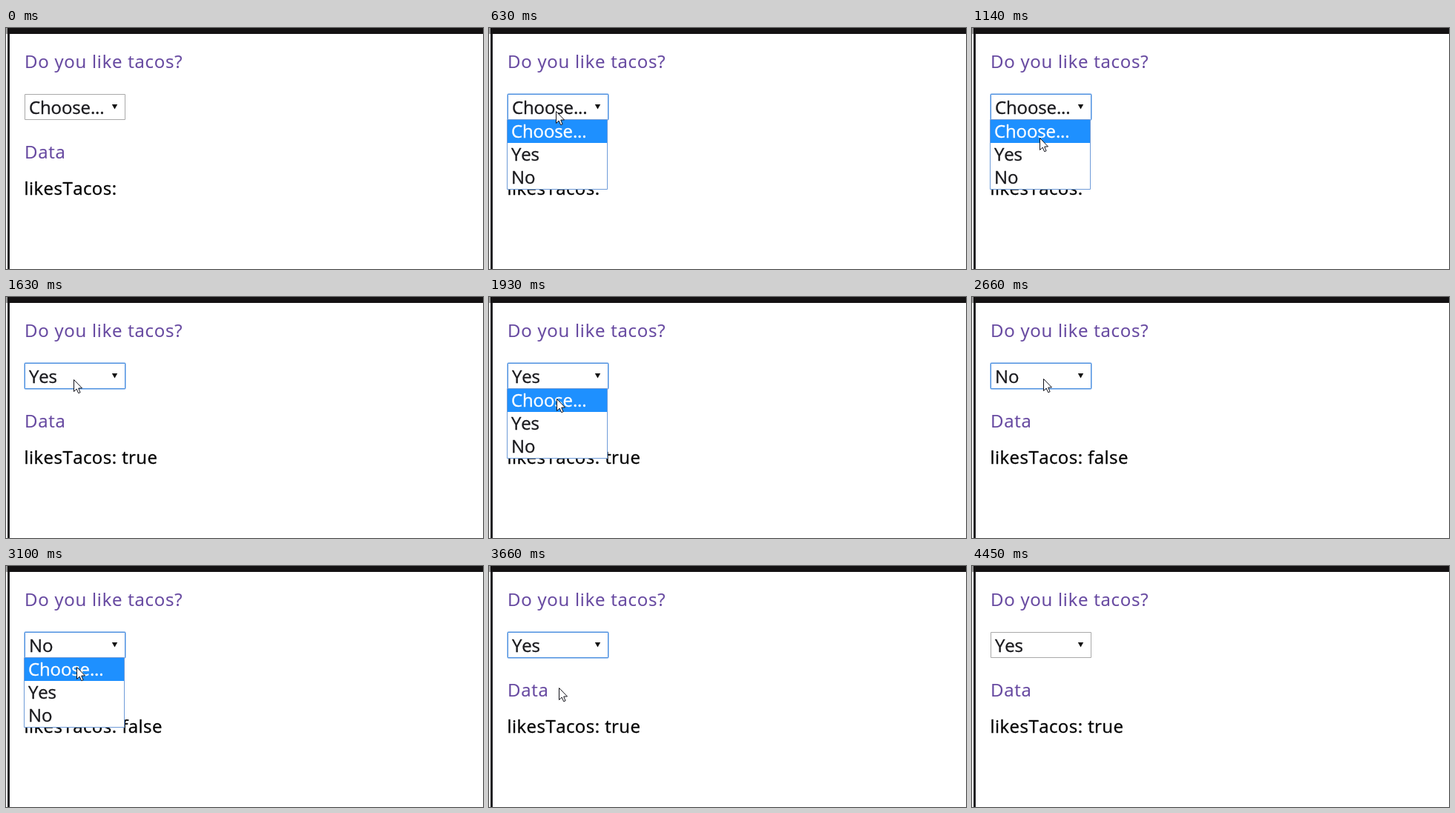
An HTML page with a canvas that plays this animation: 643x325 px, repeating every 4630 ms.

```html
<!DOCTYPE html>
<html lang="en">
<head>
<meta charset="utf-8">
<title>Select binding</title>
<style>
html, body { margin: 0; width: 100%; height: 100%; overflow: hidden; background: #fff; }
canvas { display: block; }
</style>
</head>
<body>
<canvas id="stage" width="643" height="325"></canvas>
<script>
const ctx = document.getElementById('stage').getContext('2d');
const LOOP = 4630, TICK = 70;
const OPTIONS = ['Choose...', 'Yes', 'No'];
const DATA = ['', ' true', ' false'];
const ROW_TOP = 124, ROW_H = 31;
const PURPLE = '#6648a0', INK = '#1a1a1e';

// [start time, selected option]
const PICKS = [[0, 0], [1420, 1], [2300, 2], [3590, 1]];
const OPENED = [[630, 1420], [1700, 2300], [2800, 3590]];
const FOCUS = [630, 4450];
const POINTER = [140, 4250];

// Pointer moves: start time, ticks, x, y, easing
const easeOut = p => u => 1 - (1 - u) ** p;
const smooth = u => u * u * (3 - 2 * u);
const MOVES = [
  [140, 1, 498, 1, smooth],
  [210, 7, 90, 112, easeOut(1.8)],
  [860, 8, 91, 165, smooth],
  [1490, 3, 91, 111, smooth],
  [1860, 5, 90, 186, smooth],
  [2370, 6, 96, 104, smooth],
  [3030, 7, 94, 164, easeOut(2.26)],
  [3730, 6, 509, 50, smooth],
  [4180, 1, 547, 23, smooth]
];

const within = (t, [a, b]) => t >= a && t < b;

function pointerAt(t) {
  let x = 498, y = 1;
  for (const [start, ticks, tx, ty, ease] of MOVES) {
    if (t < start) break;
    const u = ease(Math.min(1, (Math.floor((t - start) / TICK) + 1) / ticks));
    x += (tx - x) * u;
    y += (ty - y) * u;
  }
  return [Math.round(x), Math.round(y)];
}

function rect(x, y, w, h, color) {
  ctx.fillStyle = color;
  ctx.fillRect(x, y, w, h);
}

function frame(x, y, w, h, color, radius = 0) {
  ctx.strokeStyle = color;
  ctx.lineWidth = 1;
  ctx.beginPath();
  ctx.roundRect(x + 0.5, y + 0.5, w - 1, h - 1, radius);
  ctx.stroke();
}

// A hairline stroke gives the slightly heavier screen weight
function text(str, x, y, color, spacing, weight = 0.35) {
  ctx.letterSpacing = spacing + 'px';
  ctx.fillStyle = ctx.strokeStyle = color;
  ctx.lineWidth = weight;
  ctx.fillText(str, x, y);
  ctx.strokeText(str, x, y);
}

function poly(points) {
  ctx.beginPath();
  points.forEach(([x, y]) => ctx.lineTo(x, y));
  ctx.closePath();
}

function drawPage(picked) {
  rect(0, 0, 643, 325, '#fff');
  rect(0, 0, 2, 8, '#999');
  rect(2, 0, 3, 325, '#202024');
  rect(2, 0, 641, 8, '#131112');
  text('Do you like tacos?', 25, 54, PURPLE, 0.75, 0.15);
  text('Data', 25, 176, PURPLE, 0.75, 0.15);
  text('likesTacos:' + DATA[picked], 24.5, 225, '#000', 0.45);
}

function drawSelect(picked, focused) {
  if (focused) frame(24, 88, 138, 37, 'rgba(77,144,225,0.5)', 2);
  frame(25, 89, 136, 35, focused ? '#4d90e0' : '#a9a9a9');
  text(OPTIONS[picked], 31, 116, INK, -0.15);
  poly([[142.8, 103], [150.2, 103], [146.5, 109.5]]);
  ctx.fillStyle = '#111';
  ctx.fill();
}

function drawList(picked, pointerY) {
  const hover = Math.floor((pointerY - ROW_TOP) / ROW_H);
  const active = hover in OPTIONS ? hover : picked;
  rect(24, 123, 136, 95, '#fff');
  frame(24, 123, 136, 95, '#6f9bd8');
  OPTIONS.forEach((label, i) => {
    const y = ROW_TOP + i * ROW_H;
    if (i === active) rect(25, y, 134, ROW_H, '#1e90ff');
    text(label, 30, y + 24, i === active ? '#fff' : INK, -0.15);
  });
}

function drawPointer(x, y) {
  ctx.save();
  ctx.translate(x + 0.5, y + 0.5);
  poly([[0, 0], [0, 16], [3.7, 12.6], [6.2, 18.2], [8.6, 17.2], [6.2, 11.6], [11, 11.4]]);
  ctx.fillStyle = '#fff';
  ctx.fill();
  ctx.strokeStyle = '#14141c';
  ctx.lineWidth = 1;
  ctx.stroke();
  ctx.restore();
}

function draw(t) {
  const picked = PICKS.filter(([start]) => t >= start).pop()[1];
  const [x, y] = pointerAt(t);
  ctx.font = '24px "Open Sans", "Noto Sans", sans-serif';
  ctx.fontKerning = 'none';
  ctx.lineJoin = 'round';
  drawPage(picked);
  drawSelect(picked, within(t, FOCUS));
  if (OPENED.some(span => within(t, span))) drawList(picked, y);
  if (within(t, POINTER)) drawPointer(x, y);
}

const began = performance.now();
function tick() {
  draw((performance.now() - began) % LOOP);
  requestAnimationFrame(tick);
}
tick();
</script>
</body>
</html>
```
